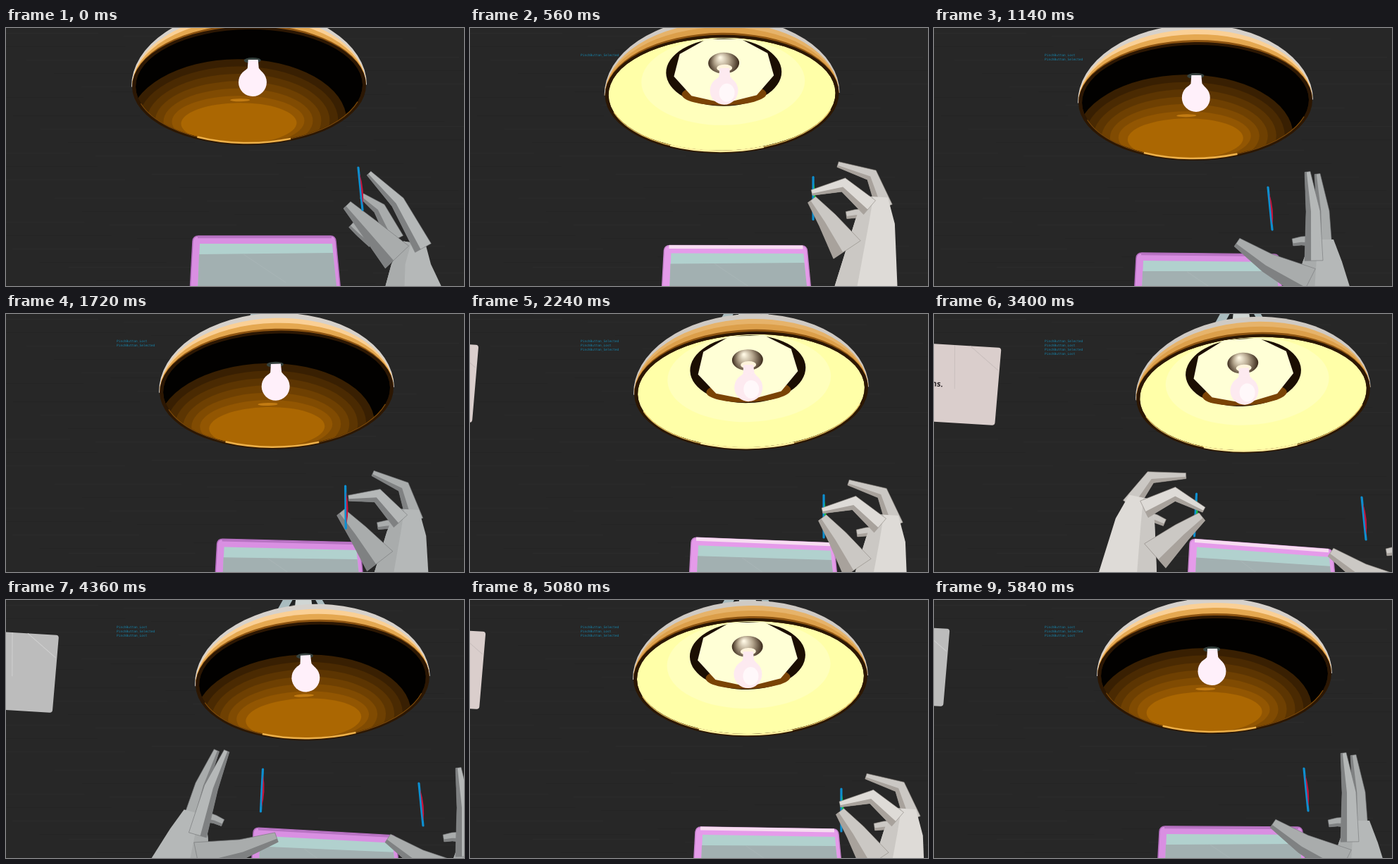
An HTML page with a canvas that plays this animation: 650x366 px, repeating every 5.86 s.

```html
<!DOCTYPE html>
<html lang="en">
<head>
<meta charset="utf-8">
<title>Pinch lamp</title>
<style>
html, body { margin: 0; width: 100%; height: 100%; overflow: hidden; background: #272727; }
canvas { display: block; width: 100vw; height: 100vh; }
</style>
</head>
<body>
<canvas id="stage" width="650" height="366"></canvas>
<script>
const ctx = document.getElementById('stage').getContext('2d');
const LOOP = 5860;
const TAU = Math.PI * 2;
const LINE_LIFE = 2550;

// Head movement and the right hand, as smooth curves through a few moments
const moments = [0, 1140, 2240, 3400, 4360, 5080, 5840];
const tracks = {
  lampX: [345, 371, 399, 453, 435, 398, 398],
  lampY: [82, 104, 109, 113, 115, 110, 106],
  tabletX: [267, 289, 316, 365, 353, 322, 322],
  tabletY: [295, 319, 317, 319, 323, 322, 321],
  roll: [0, 2, 8, 15, 11, 3, 1],
  handX: [503, 477, 502, 610, 589, 527, 528],
  handY: [228, 256, 287, 290, 290, 298, 269]
};

// The lamp is lit while a hand pinches its button
const pinches = [
  { start: 400, end: 900, hand: 'right' },
  { start: 1750, end: 2500, hand: 'right' },
  { start: 3050, end: 3900, hand: 'left' },
  { start: 4750, end: 5400, hand: 'right' }
];
const leftVisit = { start: 2600, end: 4740 };

// Limbs run tip, joint, base, measured from the button's middle
const poses = {
  side: {
    middle: [2, 10, 27, 28, 50, 72],
    pinky: [-13, 51, -1, 62, 17, 77],
    palm: [77, 77, 72, 107, 77, 172],
    index: [12, -22, 53, 19, 89, 84],
    thumb: [-19, 23, 12, 55, 52, 97]
  },
  open: {
    middle: [67, -49, 75, 4, 77, 69],
    pinky: [32, 48, 44, 46, 56, 46],
    palm: [74, 44, 74, 76, 76, 160],
    index: [53, -52, 61, 4, 62, 74],
    thumb: [-47, 48, -4, 77, 54, 106]
  },
  pinch: {
    middle: [35, -48, 83, -33, 101, 13],
    pinky: [47, 24, 60, 22, 80, 21],
    palm: [90, -2, 88, 33, 70, 170],
    index: [-2, -8, 43, -19, 80, 13],
    thumb: [-2, 2, 20, 31, 48, 73]
  }
};
// Half widths along each limb
const girth = {
  middle: [4, 9, 12], pinky: [5, 6, 7], palm: [16, 28, 52],
  index: [4, 10, 13], thumb: [7, 14, 23]
};

const mix = (a, b, k) => a + (b - a) * k;
const clamp = v => Math.max(0, Math.min(1, v));
const ease = v => { const k = clamp(v); return k * k * (3 - 2 * k); };

function follow(values, t) {
  const last = moments.length - 1;
  let i = 0;
  while (i < last - 1 && t >= moments[i + 1]) i++;
  const slope = n => {
    const a = Math.max(0, n - 1), b = Math.min(last, n + 1);
    return (values[b] - values[a]) / (moments[b] - moments[a]);
  };
  const span = moments[i + 1] - moments[i];
  const k = clamp((t - moments[i]) / span), k2 = k * k, k3 = k2 * k;
  return mix(values[i], values[i + 1], 3 * k2 - 2 * k3) +
    span * ((k3 - 2 * k2 + k) * slope(i) + (k3 - k2) * slope(i + 1));
}

// 0 for an open hand, 1 for closed fingers
function grip(hand, t) {
  return Math.max(...pinches.filter(p => p.hand === hand)
    .map(p => ease((t - p.start + 140) / 140) * ease((p.end + 140 - t) / 140)));
}

function poly(points, fill, edge) {
  ctx.beginPath();
  for (const [x, y] of points) ctx.lineTo(x, y);
  ctx.closePath();
  ctx.fillStyle = fill;
  ctx.fill();
  if (edge) {
    ctx.strokeStyle = edge;
    ctx.lineWidth = 0.6;
    ctx.stroke();
  }
}

function oval(x, y, rx, ry, fill) {
  ctx.beginPath();
  ctx.ellipse(x, y, rx, ry, 0, 0, TAU);
  ctx.fillStyle = fill;
  ctx.fill();
}

function dome(rx, ry, fill) {
  ctx.beginPath();
  ctx.ellipse(0, 0, rx, ry, 0, Math.PI, TAU);
  ctx.fillStyle = fill;
  ctx.fill();
}

function arc(rx, ry, from, to, color, width) {
  ctx.beginPath();
  ctx.ellipse(0, 0, rx, ry, 0, from, to);
  ctx.strokeStyle = color;
  ctx.lineWidth = width;
  ctx.stroke();
}

function line(x1, y1, x2, y2, color, width) {
  ctx.beginPath();
  ctx.moveTo(x1, y1);
  ctx.lineTo(x2, y2);
  ctx.strokeStyle = color;
  ctx.lineWidth = width;
  ctx.stroke();
}

function drawWall() {
  ctx.fillStyle = '#272727';
  ctx.fillRect(0, 0, 650, 366);
  for (let i = 0; i < 60; i++) {
    ctx.fillStyle = i % 2 ? 'rgba(255,255,255,.018)' : 'rgba(0,0,0,.07)';
    ctx.fillRect((i * 197) % 650 - 90, (i * 83) % 366, 180, 1);
  }
}

function drawCard(x, y, lit) {
  ctx.save();
  ctx.transform(1, 0.06, -0.085, 1, x, y);
  ctx.beginPath();
  ctx.roundRect(-230, 0, 230, 110, 4);
  ctx.fillStyle = lit ? '#dacecc' : '#bcbcbc';
  ctx.fill();
  const crease = lit ? '#c9bfbd' : '#d0d0d0';
  line(-66, 0, -61, 62, crease, 1);
  line(-44, 0, -2, 32, crease, 1);
  ctx.fillStyle = '#2b2528';
  ctx.font = 'bold 11px "Open Sans", sans-serif';
  ctx.textAlign = 'right';
  ctx.textBaseline = 'alphabetic';
  ctx.fillText('Pinch the buttons.', -78, 60);
  ctx.restore();
}

function drawLitShade(bx) {
  oval(0, 0, 161, 80, '#ffffa8');
  oval(bx * 0.6, -18, 116, 62, '#ffffbc');
  oval(bx, -31, 82, 48, '#1b0e02');
  oval(bx, 0, 60, 16, '#7a4305');
  const facets = Array.from({ length: 9 }, (_, i) => {
    const a = (i + 0.25) / 9 * TAU;
    return [bx + 72 * Math.cos(a), -34 + 47 * Math.sin(a)];
  });
  poly(facets, '#ffffd6');
}

function drawDarkShade() {
  oval(0, 0, 161, 81, '#020100');
  for (let i = 0; i < 6; i++) {
    const k = i / 5;
    oval(-16, 50, mix(154, 94, k), mix(88, 36, k),
      `rgb(${mix(56, 146, k)}, ${mix(31, 86, k)}, 2)`);
  }
  oval(-15, 53, 82, 29, '#ab6702');
  oval(-13, 20, 14, 2, '#c27b12');
}

function drawBulb(x, lit) {
  if (lit) {
    const metal = ctx.createRadialGradient(x - 5, -52, 1, x, -44, 22);
    metal.addColorStop(0, '#fff8e4');
    metal.addColorStop(0.45, '#b5a68e');
    metal.addColorStop(1, '#382718');
    oval(x, -44, 22, 15, metal);
    oval(x + 1, -37, 11, 5, '#fff4dc');
  } else {
    oval(x, -36, 12, 4, '#35423f');
  }
  const glass = lit ? '#fdeaf0' : '#fff0fa';
  poly([[x - 6, -37], [x + 8, -37], [x + 9, -25], [x + 16, -16], [x - 16, -16], [x - 7, -25]], glass);
  oval(x, -5, 20, 20, glass);
  if (lit) oval(x + 4, -2, 11, 13, '#fff8fa');
}

function drawLamp(x, y, tilt, lit) {
  const bx = 350 + (x - 345) * 0.84 - x;
  ctx.save();
  ctx.translate(x, y);
  ctx.rotate(tilt * Math.PI / 180);
  poly([[bx - 38, -100], [bx - 22, -126], [bx + 22, -126], [bx + 36, -100]], '#a9bcbf');
  poly([[bx - 24, -100], [bx - 14, -116], [bx + 18, -116], [bx + 26, -100]], '#202222');
  poly([[bx - 12, -100], [bx - 8, -126], [bx + 12, -126], [bx + 14, -100]], '#d0d6d4');
  dome(167, 109, lit ? '#cfcac4' : '#d6d1cb');
  dome(166, 102, lit ? '#e6b36a' : '#fad096');
  dome(166, 95, lit ? '#dc9f4a' : '#e5a850');
  dome(166, 87, '#8c5311');
  oval(0, 0, 166, 84, '#2c1703');
  ctx.save();
  ctx.beginPath();
  ctx.ellipse(0, 0, 161, 80, 0, 0, TAU);
  ctx.clip();
  if (lit) drawLitShade(bx);
  else drawDarkShade();
  drawBulb(bx, lit);
  ctx.restore();
  arc(161, 81, 0.3, Math.PI - 0.3, lit ? '#e9c463' : '#7b4808', 1.2);
  arc(161, 81, 1.2, 2.05, lit ? '#fff0a0' : '#eeb048', 2.6);
  ctx.restore();
}

function drawTablet(x, y, roll, lit) {
  ctx.save();
  ctx.transform(1, roll / 200, 0, 1, x, y);
  ctx.beginPath();
  ctx.moveTo(-6, 80);
  ctx.lineTo(-2, 7);
  ctx.quadraticCurveTo(-1, 0, 6, 0);
  ctx.lineTo(194, 0);
  ctx.quadraticCurveTo(200, 0, 201, 7);
  ctx.lineTo(208, 80);
  ctx.fillStyle = lit ? '#e59bea' : '#d98fe2';
  ctx.fill();
  ctx.strokeStyle = lit ? '#c583cb' : '#b06bbb';
  ctx.lineWidth = 1.5;
  ctx.stroke();
  line(5, 2, 195, 2, lit ? '#f7dcf1' : '#b873c3', lit ? 5 : 2.5);
  poly([[8, 11], [196, 11], [202, 80], [5, 80]], '#b1d1ce');
  poly([[7, 26], [197, 24], [203, 80], [5, 80]], '#a2b0b1');
  line(70, 26, 130, 66, '#adb8b9', 0.7);
  ctx.restore();
}

function drawButton(x, y, lean, pinched) {
  ctx.save();
  ctx.translate(x, y);
  ctx.transform(1, 0, lean / 60, 1, 0, 0);
  ctx.lineCap = 'round';
  line(0, -30, 0, 30, '#0d8fd0', 3.2);
  ctx.beginPath();
  ctx.moveTo(1, -22);
  ctx.quadraticCurveTo(6, 2, 1, 24);
  ctx.closePath();
  ctx.fillStyle = pinched ? '#18c843' : '#c8143c';
  ctx.fill();
  ctx.restore();
}

// A tapered limb with a shaded underside
function drawLimb(p, widths, fill, shade, edge) {
  const near = [], mid = [], far = [];
  for (let i = 0; i < 3; i++) {
    const a = Math.max(0, i - 1) * 2, b = Math.min(2, i + 1) * 2;
    const dx = p[b] - p[a], dy = p[b + 1] - p[a + 1];
    const w = widths[i] / Math.hypot(dx, dy);
    const x = p[i * 2], y = p[i * 2 + 1];
    near.push([x - dy * w, y + dx * w]);
    mid.push([x - dy * w * 0.3, y + dx * w * 0.3]);
    far.push([x + dy * w, y - dx * w]);
  }
  poly([...near, ...far.reverse()], fill, edge);
  poly([...near, ...mid.reverse()], shade);
}

function drawHand(from, closed, lit) {
  const [base, light, shade, edge] = lit
    ? ['#cbc8c4', '#dedbd7', '#a8a29c', '#8b8680']
    : ['#a9acac', '#b5b8b8', '#7f8182', '#747677'];
  ctx.lineJoin = 'round';
  for (const name of Object.keys(girth)) {
    const limb = poses[from][name].map((v, i) => mix(v, poses.pinch[name][i], closed));
    const palm = name === 'palm';
    drawLimb(limb, girth[name], palm || name === 'index' ? light : base,
      palm ? base : shade, palm ? null : edge);
  }
}

function drawRight(x, y, t, lit) {
  const closed = grip('right', t);
  const pinched = closed > 0.95;
  const button = () => drawButton(x, y, mix(6, 0, closed), pinched);
  if (pinched) button();
  ctx.save();
  ctx.translate(x, y);
  drawHand(t < pinches[0].start ? 'side' : 'open', closed, lit);
  ctx.restore();
  if (!pinched) button();
}

function drawLeft(t, lit) {
  if (t < leftVisit.start || t > leftVisit.end) return;
  const closed = grip('left', t);
  const away = 1 - ease((t - leftVisit.start) / 400) * ease((leftVisit.end - t) / 340);
  const x = 363 + 8 * closed - 80 * away;
  const y = 270 + 15 * closed + 160 * away;
  drawButton(x, y, -3, closed > 0.95);
  ctx.save();
  ctx.translate(x + mix(-12, 8, closed), y + mix(8, 0, closed));
  ctx.rotate(Math.PI / 12);
  ctx.scale(-1, 1);
  drawHand('open', closed, lit);
  ctx.restore();
}

function drawLog(t) {
  ctx.font = '4.5px "DejaVu Sans Mono", monospace';
  ctx.textAlign = 'left';
  ctx.textBaseline = 'middle';
  ctx.fillStyle = '#1684ab';
  pinches.flatMap(p => [[p.start, 'PinchButton_Selected'], [p.end, 'PinchButton_Lost']])
    .filter(([time]) => t >= time && t < time + LINE_LIFE)
    .reverse()
    .forEach(([, text], row) => ctx.fillText(text, 157, 39 + row * 6));
}

function draw(t) {
  const lit = pinches.some(p => t >= p.start && t < p.end);
  const now = {};
  for (const name in tracks) now[name] = follow(tracks[name], t);
  drawWall();
  drawCard(now.tabletX * 1.7 - 525, now.lampY - 65, lit);
  drawLog(t);
  drawLamp(now.lampX, now.lampY, -0.5 - now.roll * 0.18, lit);
  drawTablet(now.tabletX, now.tabletY, now.roll, lit);
  drawLeft(t, lit);
  drawRight(now.handX, now.handY, t, lit);
}

const began = performance.now();
function tick() {
  draw((performance.now() - began) % LOOP);
  requestAnimationFrame(tick);
}
tick();
</script>
</body>
</html>
```
